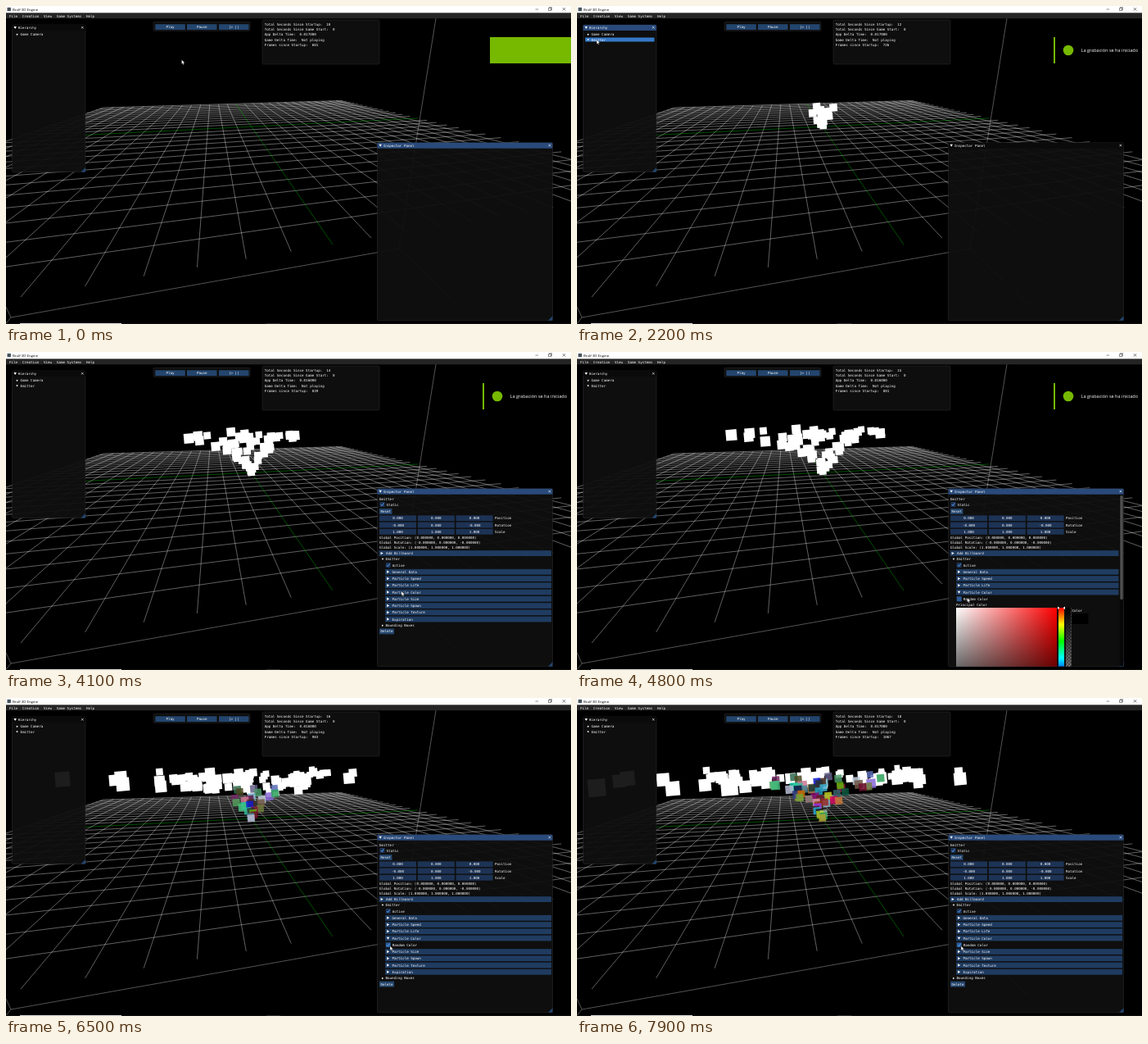
Animation of 690 by 388 pixels, one loop 8000 ms. Source, as an HTML page:

```html
<!DOCTYPE html>
<html lang="en">
<head>
<meta charset="utf-8">
<title>Particle editor</title>
<style>
html, body { margin: 0; width: 100%; height: 100%; overflow: hidden; background: #000; }
svg { display: block; width: 100vw; height: 100vh; }
text { font: 4.2px "DejaVu Sans Mono", "Liberation Mono", monospace; fill: #fff; white-space: pre; }
.sans { font-family: "Open Sans", "Noto Sans", sans-serif; }
</style>
</head>
<body>
<svg viewBox="0 0 690 388" preserveAspectRatio="none">
  <defs>
    <linearGradient id="sat"><stop stop-color="#fff"/><stop offset="1" stop-color="#f00"/></linearGradient>
    <linearGradient id="val" x2="0" y2="1"><stop stop-color="#000" stop-opacity="0"/><stop offset="1"/></linearGradient>
    <linearGradient id="fade" x2="0" y2="1"><stop/><stop offset="1" stop-opacity="0"/></linearGradient>
    <linearGradient id="hue" x2="0" y2="1">
      <stop stop-color="#f00"/><stop offset=".167" stop-color="#ff0"/><stop offset=".333" stop-color="#0f0"/>
      <stop offset=".5" stop-color="#0ff"/><stop offset=".667" stop-color="#00f"/>
      <stop offset=".833" stop-color="#f0f"/><stop offset="1" stop-color="#f00"/>
    </linearGradient>
    <pattern id="checker" width="4" height="4" patternUnits="userSpaceOnUse">
      <path d="M0 0h4v4h-4z" fill="#ccc"/><path d="M0 0h2v2h-2zM2 2h2v2h-2z" fill="#808080"/>
    </pattern>
    <clipPath id="inspectorClip"><path d="M454 174H667V383.5H454z"/></clipPath>
  </defs>
  <g id="floor" fill="none"></g>
  <g id="particles"></g>
  <g id="ui"></g>
</svg>
<script>
const LOOP = 8000, STEP = 100;
const SPAWN_AT = 1400, SELECT_AT = 2400, EXPAND_AT = 3100, COLOR_AT = 4200, RANDOM_AT = 5200;
const BLUE = '#294a7a', BUTTON = '#23456d', HEADER = '#1f3b60', FIELD = '#1d3355', HOVER = '#3578c6';
const $ = id => document.getElementById(id);

// Perspective: u runs right, v toward the viewer, z up, all in grid cells.
const HALF = 14;
function project(u, v, z = 0) {
  const away = (HALF - v) * 0.1486, up = z * 0.0549;
  const w = 1 + u * 0.03855 + away - up;
  return {
    x: (399 + 64.19 * u + 252 * away - 345 * up) / w,
    y: (291 + 3.02 * u + 78 * away - 1100 * up) / w,
    w
  };
}

function segment(a, b) {
  return `M${a.x.toFixed(2)} ${a.y.toFixed(2)}L${b.x.toFixed(2)} ${b.y.toFixed(2)}`;
}

function drawFloor() {
  let white = '', green = '';
  for (let i = -HALF; i < HALF; i++) {
    const lines = segment(project(i, -HALF), project(i, HALF)) + segment(project(-HALF, i), project(HALF, i));
    if (i) white += lines; else green += lines;
  }
  $('floor').innerHTML =
    `<path d="${white}" stroke="#fff" stroke-width=".38"/>
     <path d="${green}" stroke="#0b0" stroke-width=".42"/>
     <path d="M525 15L480 296L6 380L0 367M6 380L0 387.5M480 296L552 364.5" stroke="#fff" stroke-width=".33"/>`;
}

function seeded(seed) {
  return () => (seed = (seed * 16807) % 2147483647) / 2147483647;
}

function makeParticles() {
  const rnd = seeded(4711), list = [];
  for (let born = SPAWN_AT; born < LOOP; born += 48) {
    const color = [rnd(), rnd(), rnd()].map(c => Math.round(c * 220));
    list.push({
      born, du: rnd() * 3.7 - 1.75, dv: (rnd() * 2 - 1) * 1.6, top: 2.85 + rnd() * 0.45,
      fill: born < RANDOM_AT ? '#fff' : `rgba(${color},.85)`
    });
  }
  return list;
}
const particles = makeParticles();

function drawParticles(t) {
  return particles.filter(p => p.born <= t).map(p => {
    const age = (t - p.born) / 1000;
    const { x, y, w } = project(p.du * age, p.dv * age, p.top * (1 - Math.exp(-0.78 * age)));
    const s = (27 + age * 0.5) / w;
    return `<rect x="${-s / 2}" y="${-s / 2}" width="${s}" height="${s}" fill="${p.fill}"
      transform="translate(${x} ${y}) rotate(-5)"/>`;
  }).join('');
}

const rect = (x, y, w, h, fill, extra = '') =>
  `<rect x="${x}" y="${y}" width="${w}" height="${h}" fill="${fill}" ${extra}/>`;
const label = (x, y, s, extra = '') => `<text x="${x}" y="${y + 1.5}" ${extra}>${s}</text>`;
const centered = (x, y, s) => label(x, y, s, 'text-anchor="middle"');
const stroke = (d, color, width = 0.6) => `<path d="${d}" fill="none" stroke="${color}" stroke-width="${width}"/>`;
const arrow = (x, y, open, r = 1.7) => open
  ? `<path d="M${x - r} ${y - r * .8}h${2 * r}l${-r} ${1.8 * r}z" fill="#fff"/>`
  : `<path d="M${x - r * .8} ${y - r}v${2 * r}l${1.8 * r} ${-r}z" fill="#fff"/>`;
const cross = (x, y, r, color) =>
  stroke(`M${x - r} ${y - r}l${2 * r} ${2 * r}m0 ${-2 * r}l${-2 * r} ${2 * r}`, color);

function frame(x, y, w, h) {
  return rect(x, y, w, h, '#0f0f0f', 'fill-opacity=".94" stroke="#3a3a42" stroke-width=".4" rx="1.5"');
}

function panel(x, y, w, h, title, focused) {
  const r = x + w, b = y + h;
  return frame(x, y, w, h) + rect(x, y, w, 7, focused ? BLUE : '#0a0a0a', 'rx="1"') +
    arrow(x + 3.7, y + 3.3, true) + label(x + 7.2, y + 3.3, title) + cross(r - 3.7, y + 3.3, 1.3, '#fff') +
    `<path d="M${r} ${b - 5.5}V${b}H${r - 5.5}z" fill="${BUTTON}"/>`;
}

function button(x, y, w, s, h = 6.8) {
  return rect(x, y - h / 2, w, h, BUTTON) + centered(x + w / 2, y, s);
}

function checkbox(x, y, s, on, hot) {
  return rect(x, y - 3, 6, 6, hot ? '#2b5a94' : FIELD) +
    (on ? stroke(`M${x + 1.2} ${y}l1.4 1.6l2.3 -3.3`, '#5aa5ff', 0.9) : '') + label(x + 8, y, s);
}

function section(x, y, s, open, right) {
  return rect(x, y - 3.4, right - x, 6.8, HEADER) + arrow(x + 3.5, y, open) + label(x + 8.5, y, s);
}

function picker() {
  const top = 312, size = 123;
  const bar = (x, w, fill) => rect(x, top, w, size, fill);
  return label(463, 308.6, 'Principal Color') + bar(463, size, 'url(#sat)') + bar(463, size, 'url(#val)') +
    bar(588, 7, 'url(#hue)') + bar(597, 6.5, 'url(#checker)') + bar(597, 6.5, 'url(#fade)') +
    '<path d="M587 310.5l2.5 1.7l-2.5 1.7zM596 310.5l-2.5 1.7l2.5 1.7z" fill="#fff"/>' +
    label(604.5, 315, 'Color') + rect(604.5, 319, 20, 13, '#000') +
    rect(662.8, 174.5, 4.5, 209, '#080808') + rect(663.3, 175, 3.4, 127, '#4f4f4f', 'rx="1.5"');
}

function inspectorBody(t) {
  if (t < SELECT_AT) return '';
  const expanded = t >= EXPAND_AT, colorOpen = t >= COLOR_AT, random = t >= RANDOM_AT;
  const picking = colorOpen && !random, right = picking ? 661.5 : 666;
  let out = label(456, 179, 'Emitter') + checkbox(456.5, 186, 'Static', true) + button(456, 194.5, 15.5, 'Reset');
  const rows = [
    ['Position', '0.000', '0.000', '0.000'],
    ['Rotation', '-0.000', '0.000', '-0.000'],
    ['Scale', '1.000', '1.000', '1.000']
  ];
  rows.forEach(([name, ...values], i) => {
    const y = 202.8 + i * 8.25;
    values.forEach((v, k) => {
      const x = 456 + k * 46.8;
      out += rect(x, y - 3.4, 45, 6.8, FIELD) + centered(x + 22.5, y, v);
    });
    out += label(597, y, name);
  });
  out += label(456, 226.2, 'Global Position: (0.000000, 0.000000, 0.000000)') +
    label(456, 232.4, 'Global Rotation: (-0.000000, 0.000000, -0.000000)') +
    label(456, 238.6, 'Global Scale: (1.000000, 1.000000, 1.000000)') +
    section(455.5, 245.6, 'Add Billboard', false, right);
  if (t >= 2800 && t < 3800) out += rect(455.5, 250.2, 210, 5, HOVER);
  out += arrow(460, 252.8, expanded, 1.2) + label(463.5, 252.8, 'Emitter');

  let y = 260;
  if (expanded) {
    out += checkbox(463.7, y, 'Active', true);
    y += 8.3;
    for (const name of ['General Data', 'Particle Speed', 'Particle Life', 'Particle Color',
      'Particle Size', 'Particle Spawn', 'Particle Texture', 'Expiration']) {
      const open = colorOpen && name === 'Particle Color';
      out += section(463, y, name, open, right);
      y += 8.25;
      if (!open) continue;
      out += checkbox(463.7, y, 'Random Color', random, t >= 4500);
      if (picking) return out + picker();
      y += 8.25;
    }
    y -= 0.6;
  }
  return out + arrow(460, y, false, 1.2) + label(463.5, y, 'Bounding Boxes') + button(456, y + 7.2, 18, 'Delete');
}

function hierarchy(t) {
  const focused = t >= 1900 && t < 3000;
  let out = panel(7.5, 23, 89.5, 179.5, 'Hierarchy', focused);
  if (t >= SPAWN_AT) {
    if (t >= 1900 && t < 2500) out += rect(10, 38.5, 84.5, 5, HOVER);
    out += arrow(13.8, 41, false, 1.2) + label(17.5, 41, 'Emitter');
  }
  return out + arrow(13.8, 34.8, false, 1.2) + label(17.5, 34.8, 'Game Camera');
}

// Piecewise blend through [time, ...values] keys.
function follow(keys, t, ease = k => k) {
  const i = keys.findIndex(k => k[0] > t);
  if (i < 0) return keys[keys.length - 1].slice(1);
  const a = keys[i - 1], b = keys[i], k = ease((t - a[0]) / (b[0] - a[0]));
  return a.slice(1).map((v, n) => v + (b[n + 1] - v) * k);
}
const smooth = k => k * k * (3 - 2 * k);

const frameKeys = [[0, 601], [2200, 726], [3400, 797], [4800, 881], [5800, 941], [7200, 1025], [8000, 1073]];
const cursorKeys = [
  [0, 214.5, 65.5], [200, 214.5, 65.5], [700, 31, 12], [1000, 31, 12], [1400, 38, 30], [1900, 24, 41],
  [2400, 24, 41], [2800, 472, 253], [3400, 473, 254], [3700, 473, 254], [4100, 483, 292], [4300, 483, 292],
  [4700, 476.5, 300], [4900, 476.5, 300], [5200, 467.5, 300.5], [5600, 492, 299], [5900, 492, 299],
  [6500, 469, 302.5], [8000, 469, 302.5]
];
// Left edge of the notice and right edge of its green cover.
const noticeKeys = [
  [0, 591, 690], [100, 582, 690], [200, 582, 690], [600, 582, 584],
  [5800, 582, 584], [6050, 582, 690], [6300, 690, 690]
];

function stats(t) {
  const delta = t > 2600 && t < 7500 ? '0.016000' : '0.017000';
  return frame(313, 17, 143, 54) + [
    `Total Seconds Since Startup:  ${Math.floor(10.4 + t / 1000)}`,
    'Total Seconds Since Game Start:  0',
    `App Delta Time:  ${delta}`,
    'Game Delta Time:  Not playing',
    `Frames since Startup:  ${Math.round(follow(frameKeys, t)[0])}`
  ].map((s, i) => label(315.7, 22.6 + i * 6.15, s)).join('');
}

function notice(t) {
  const [left, edge] = follow(noticeKeys, t, smooth);
  let out = rect(left, 38, 690 - left, 32, '#000');
  if (t >= 400 && t < 6050) {
    out += '<circle cx="600" cy="54" r="6.3" fill="#76b900"/>' +
      label(615.5, 54.5, 'La grabación se ha iniciado', 'class="sans" style="font-size:5.55px"');
  }
  return out + rect(left, 38, edge - left, 32, '#76b900');
}

function chrome() {
  return rect(0, 0, 690, 8.6, '#fff') + rect(1.5, 1.8, 4.4, 4.4, '#48545c') +
    label(8, 4.2, 'Brulf 3D Engine', 'class="sans" style="font-size:4.3px;fill:#000"') +
    stroke('M646.5 4h3.6M662.5 2.6h3v3h-3zM663.5 2.6v-1h3v3h-1', '#222', 0.5) + cross(681.5, 3.8, 1.7, '#222') +
    rect(0, 8.6, 690, 6.6, '#242424') +
    [[4, 'File'], [20, 'Creation'], [46, 'View'], [62, 'Game Systems'], [98, 'Help']]
      .map(([x, s]) => label(x, 12, s)).join('') +
    rect(0, 387, 690, 1, '#101010') + rect(17, 387, 124, 1, '#ddd') + rect(318, 387, 17, 1, '#333');
}

function pointer(t) {
  const [x, y] = follow(cursorKeys, t, smooth);
  return `<path transform="translate(${x} ${y})" d="M0 0V5.4L1.2 4.3L2 6.2L3 5.8L2.2 4H3.9z"
    fill="#fff" stroke="#000" stroke-width=".3"/>`;
}

function draw(t) {
  $('particles').innerHTML = drawParticles(t);
  $('ui').innerHTML = chrome() + hierarchy(t) +
    frame(180, 19.3, 118, 11) + button(182.3, 25.6, 36.5, 'Play') + button(221, 25.6, 36.5, 'Pause') +
    button(260, 25.6, 36.5, '|&gt; ||') + stats(t) +
    panel(453.5, 166.8, 214, 217, 'Inspector Panel', t < 500 || t >= 3000) +
    `<g clip-path="url(#inspectorClip)">${inspectorBody(t)}</g>` + notice(t) + pointer(t);
}

drawFloor();
const start = performance.now();
let shown = -1;
function tick() {
  const t = Math.floor(((performance.now() - start) % LOOP) / STEP) * STEP;
  if (t !== shown) draw(shown = t);
  requestAnimationFrame(tick);
}
tick();
</script>
</body>
</html>
```
